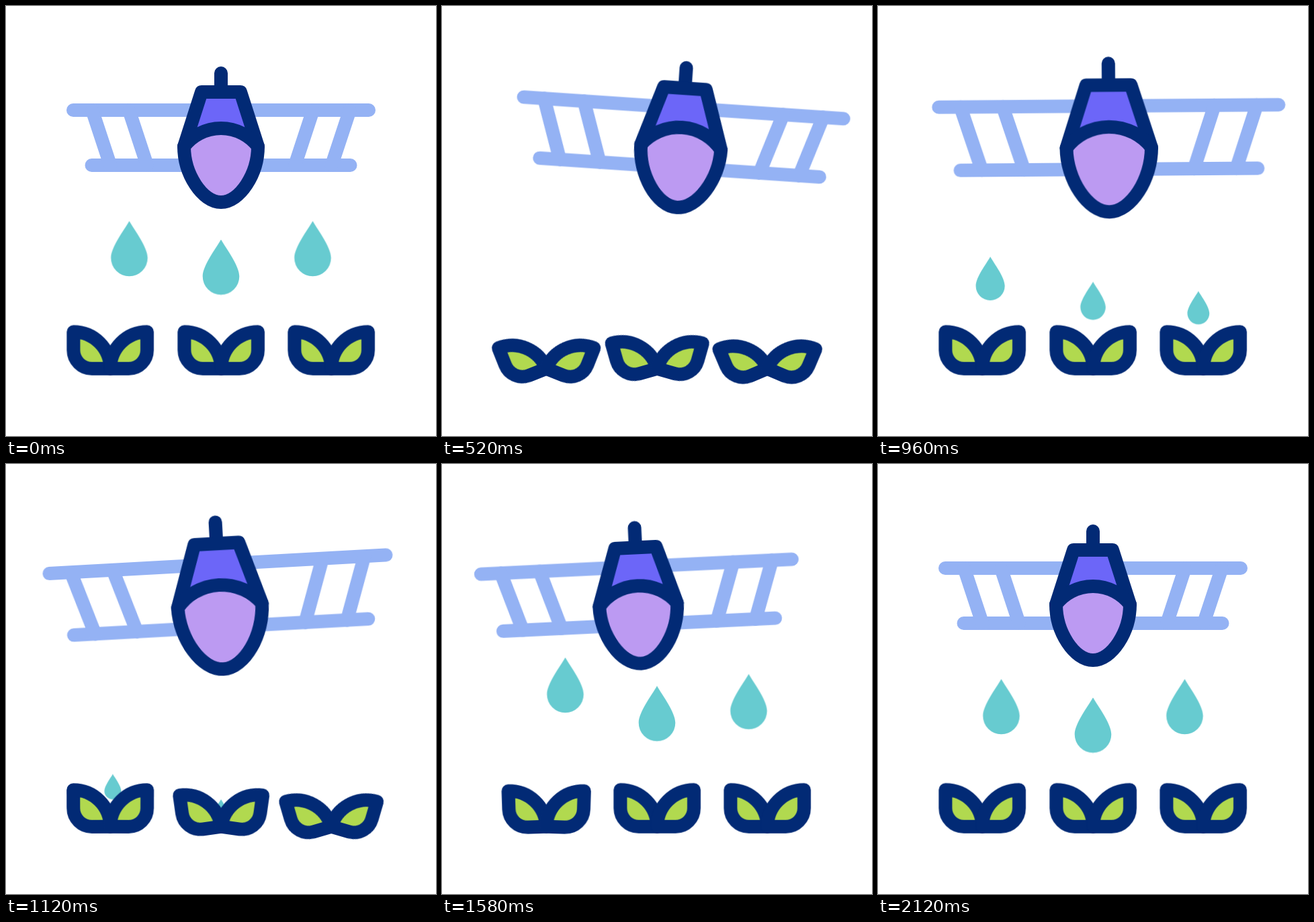
Animation, 640 px wide and 640 px high, one loop 2.4 s. Source, as an HTML page without scripts:

```html
<!DOCTYPE html>
<html lang="en">
<head>
<meta charset="utf-8">
<title>Crop duster</title>
<style>
html, body { margin: 0; width: 100%; height: 100%; overflow: hidden; background: #fff; }
svg { display: block; width: 100%; height: 100%; }

/* Lines keep their weight while the plane grows */
.line {
  fill: none; stroke-width: 20; stroke-linecap: round; stroke-linejoin: round;
  vector-effect: non-scaling-stroke;
}
.navy { stroke: #022a75; }
.wing { stroke: #94b2f4; }
.drop { fill: #67cbd0; }

.plane {
  transform-origin: 320px 196px;
  animation: slide 2.4s infinite, tilt 2.4s infinite, grow 2.4s infinite;
  animation-timing-function: cubic-bezier(.333, 0, .667, 1);
}
@keyframes slide {
  0%, 88.33%, 100% { translate: 0 0; }
  30% { translate: 45px 0; }
  59.17% { translate: -33px 0; }
}
@keyframes tilt {
  0%, 86.7%, 100% { rotate: 0deg; }
  25.83% { rotate: 4.15deg; }
  52.5% { rotate: -4.15deg; }
}
@keyframes grow {
  0%, 83.3%, 100% { scale: 1; }
  40% { scale: 1.15; }
}

/* Each drop: fall from rest, fall again from the wing, then settle */
.drop { animation: 2.4s linear infinite; }
.drop.l { animation-name: fall-l; }
.drop.m { animation-name: fall-m; }
.drop.r { animation-name: fall-r; }
@keyframes fall-l {
  0%, 3.75%, 69.75%, 100% { transform: translate(183.5px, 361px) scale(1); }
  18.5% { transform: translate(155px, 520px) scale(.35); }
  18.51%, 26.9% { transform: translate(183.5px, 257px) scale(0); }
  35.8% { transform: translate(172.4px, 358px) scale(1); }
  49.9% { transform: translate(155px, 516px) scale(.3); }
  49.91%, 57.1% { transform: translate(183.5px, 257px) scale(0); }
  65.4% { transform: translate(183.5px, 325px) scale(1); }
}
@keyframes fall-m {
  0%, 3.3%, 67.8%, 100% { transform: translate(320px, 388.5px) scale(1); }
  15.5% { transform: translate(320px, 522px) scale(.3); }
  15.51%, 26.2% { transform: translate(320px, 284px) scale(0); }
  34.3% { transform: translate(320px, 375px) scale(1); }
  47.2% { transform: translate(320px, 518px) scale(.3); }
  47.21%, 55.8% { transform: translate(320px, 284px) scale(0); }
  65% { transform: translate(320px, 363.5px) scale(1); }
}
@keyframes fall-r {
  0%, .6%, 66.75%, 100% { transform: translate(456.5px, 361px) scale(1); }
  14.6% { transform: translate(484px, 518px) scale(.3); }
  14.61%, 25.9% { transform: translate(456.5px, 257px) scale(0); }
  33.46% { transform: translate(467.4px, 360px) scale(1); }
  45% { transform: translate(484px, 516px) scale(.3); }
  45.01%, 54.6% { transform: translate(456.5px, 257px) scale(0); }
  63.3% { transform: translate(456.5px, 331.5px) scale(1); }
}

/* Leaves open outwards when hit */
.leaf { animation: 2.4s linear infinite; }
.l .leaf { animation-name: dip-l; }
.m .leaf { animation-name: dip-m; }
.r .leaf { animation-name: dip-r; }
@keyframes dip-l {
  0%, 13.04%, 33.04%, 46.63%, 66.63%, 100% { transform: rotate(0deg); }
  23.04%, 56.63% { transform: rotate(-25deg); }
}
@keyframes dip-m {
  0%, 8.04%, 28.04%, 43.5%, 63.5%, 100% { transform: rotate(0deg); }
  18.04%, 53.5% { transform: rotate(-25deg); }
}
@keyframes dip-r {
  0%, 12.5%, 32.5%, 40.2%, 60.2%, 100% { transform: rotate(0deg); }
  22.5%, 50.2% { transform: rotate(-25deg); }
}
</style>
</head>
<body>
<svg viewBox="0 0 640 640" xmlns="http://www.w3.org/2000/svg">
  <defs>
    <path id="drop" d="M0-41C8-27 27.3-2 27.3 14A27.3 27.3 0 0 1-27.3 14C-27.3-2-8-27 0-41Z"/>
    <path id="leaf" class="line navy" style="fill:#b1d94f"
      d="M-54.8-54.8A54.8 54.8 0 0 1 0 0H-27.4A27.4 27.4 0 0 1-54.8-27.4Z"/>
    <path id="struts" class="line wing" d="M128.2 155L155.3 237M183 155L210 237"/>
  </defs>

  <g class="drop l"><use href="#drop"/></g>
  <g class="drop m"><use href="#drop"/></g>
  <g class="drop r"><use href="#drop"/></g>

  <g class="l" transform="translate(155.2 539.7)">
    <g class="leaf"><use href="#leaf"/></g>
    <g transform="scale(-1 1)"><g class="leaf"><use href="#leaf"/></g></g>
  </g>
  <g class="m" transform="translate(320.2 539.7)">
    <g class="leaf"><use href="#leaf"/></g>
    <g transform="scale(-1 1)"><g class="leaf"><use href="#leaf"/></g></g>
  </g>
  <g class="r" transform="translate(484.2 539.7)">
    <g class="leaf"><use href="#leaf"/></g>
    <g transform="scale(-1 1)"><g class="leaf"><use href="#leaf"/></g></g>
  </g>

  <g class="plane">
    <path class="line wing" d="M100 155H540M127.5 237H512.5"/>
    <use href="#struts"/>
    <use href="#struts" transform="translate(640 0) scale(-1 1)"/>
    <path class="line navy" d="M320 100V124"/>
    <path class="line navy" style="fill:#6c66f8" d="M291 128H349L375 209H265Z"/>
    <path class="line navy" style="fill:#bc9af2"
      d="M265 209A69.5 69.5 0 0 1 375 209C375 250 348 292 320 292C292 292 265 250 265 209Z"/>
  </g>
</svg>
</body>
</html>
```
